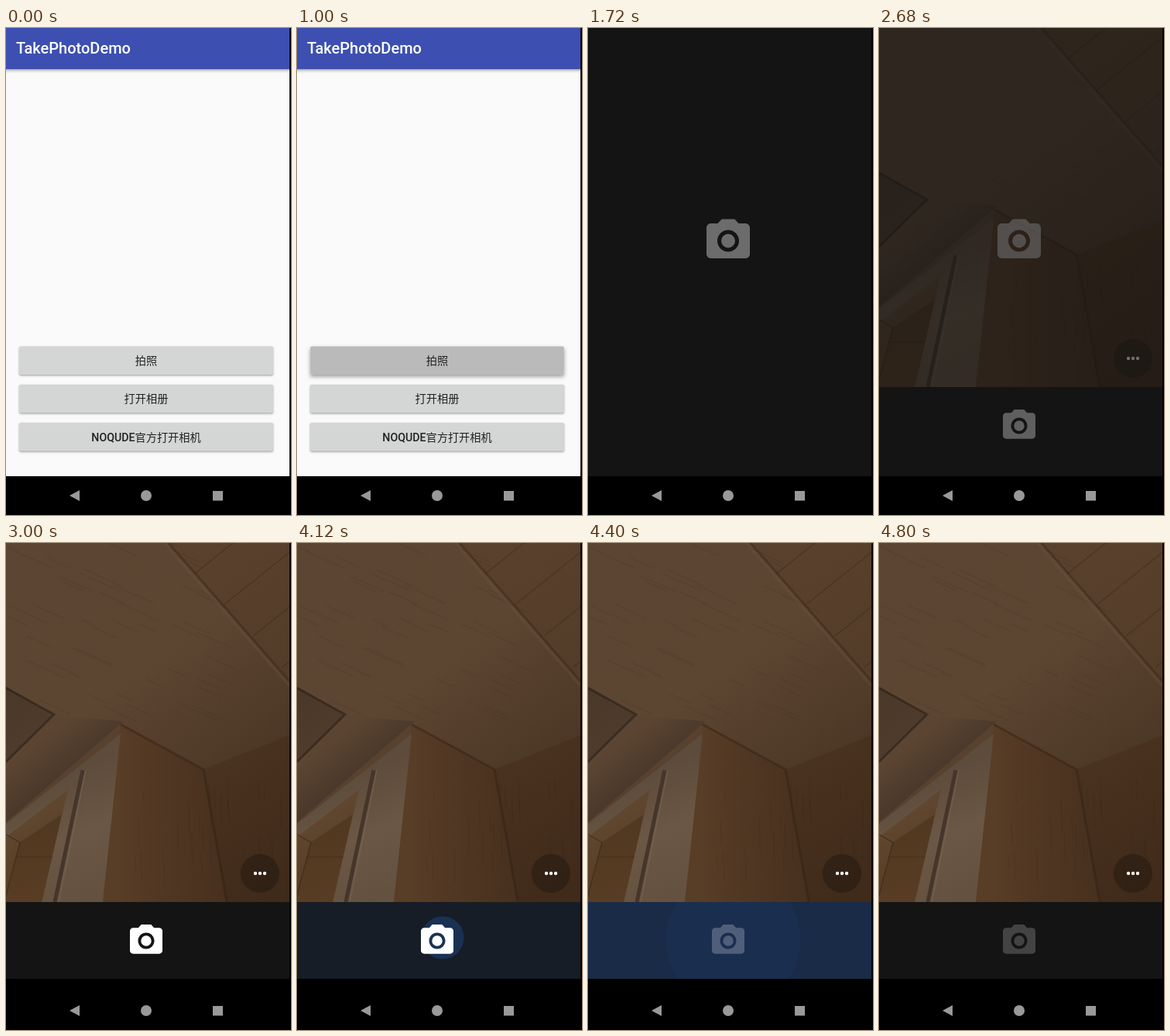
These frames come from a looping animation (368x628 px, 5.08 s). An HTML page with a canvas:

```html
<!DOCTYPE html>
<html lang="zh">
<head>
<meta charset="utf-8">
<title>TakePhotoDemo</title>
<style>
html, body { margin: 0; width: 100%; height: 100%; overflow: hidden; background: #000; }
canvas { display: block; }
</style>
</head>
<body>
<canvas id="stage" width="368" height="628"></canvas>
<script>
const LOOP = 5080;
const W = 366, NAV_Y = 578, BAR_Y = 463, BAR_END = 562;
const DARK = '#141414';
const ctx = document.getElementById('stage').getContext('2d');
const CAMERA = new Path2D('M9 2L7.17 4H4c-1.1 0-2 .9-2 2v12c0 1.1.9 2 2 2h16c1.1 0 2-.9 2-2V6c0-1.1-.9-2-2-2h-3.17L15 2H9zm3 15c-2.76 0-5-2.24-5-5s2.24-5 5-5 5 2.24 5 5-2.24 5-5 5zM15.2 12a3.2 3.2 0 1 1-6.4 0a3.2 3.2 0 1 1 6.4 0z');

const clamp = v => Math.max(0, Math.min(1, v));
const ramp = (t, from, to) => clamp((t - from) / (to - from));
const mix = (a, b, k) => a + (b - a) * k;

function rect(x, y, w, h, fill) {
  ctx.fillStyle = fill;
  ctx.fillRect(x, y, w, h);
}

function disc(c, x, y, r, fill) {
  c.fillStyle = fill;
  c.beginPath();
  c.arc(x, y, r, 0, Math.PI * 2);
  c.fill();
}

function trace(c, pts) {
  c.beginPath();
  for (let i = 0; i < pts.length; i += 2) c.lineTo(pts[i], pts[i + 1]);
}

function poly(c, fill, ...pts) {
  trace(c, pts);
  c.closePath();
  c.fillStyle = fill;
  c.fill();
}

function line(c, color, width, ...pts) {
  trace(c, pts);
  c.strokeStyle = color;
  c.lineWidth = width;
  c.stroke();
}

function shade(c, x0, y0, x1, y1, ...colors) {
  const g = c.createLinearGradient(x0, y0, x1, y1);
  colors.forEach((col, i) => g.addColorStop(i / (colors.length - 1), col));
  return g;
}

// Wooden room seen by the camera
function makeRoom() {
  const room = document.createElement('canvas');
  room.width = W;
  room.height = BAR_Y;
  const c = room.getContext('2d');
  c.fillStyle = shade(c, 60, 0, 300, 330, '#5c4532', '#5c4531', '#4a3524');
  c.fillRect(0, 0, W, BAR_Y);

  // planked ceiling on the right
  poly(c, shade(c, 240, 0, 366, 170, '#5a412d', '#533c28'), 208, 0, W, 0, W, 180);
  for (let i = 0; i < 4; i++) {
    const x = 243 + i * 38, y = 40 + i * 40;
    line(c, 'rgba(50,34,22,.4)', 1.2, x, y, x + 90, y - 72);
  }
  line(c, 'rgba(48,34,23,.35)', 3, 210, 0, W, 178);
  line(c, 'rgba(112,88,66,.25)', 4, 204, 0, W, 184);

  // recess and beam on the left
  poly(c, shade(c, 0, 200, 40, 260, '#4a3829', '#503c2c'), 0, 185, 62, 221, 0, 284);
  line(c, 'rgba(46,33,24,.6)', 3, 0, 187, 62, 221, 0, 282);
  poly(c, shade(c, 40, 260, 75, 305, '#5b4431', '#49372a'), 0, 290, 64, 222, 152, 230, 0, 360);

  // right walls
  poly(c, shade(c, 145, 0, 285, 0, '#583d27', '#4f3622', '#47301e'), 148, 232, 255, 292, 285, BAR_Y, 125, BAR_Y);
  poly(c, shade(c, 255, 280, 366, 440, '#4a331f', '#452e1c', '#402a1a'), 255, 292, W, 248, W, BAR_Y, 285, BAR_Y);
  line(c, 'rgba(45,30,19,.4)', 3, 148, 234, 255, 292, 285, BAR_Y);

  // pale door frame
  poly(c, shade(c, 60, 300, 120, 450, '#5d4b3b', '#6a5745', '#65513f'), 0, 362, 148, 246, 125, BAR_Y, 0, BAR_Y);
  poly(c, shade(c, 0, 360, 60, 450, '#614832', '#54391f'), 0, 379, 80, 318, 46, BAR_Y, 0, BAR_Y);
  poly(c, shade(c, 20, 370, 40, 463, '#513820', '#583d24'), 18, 386, 72, 350, 46, BAR_Y, 0, BAR_Y);
  line(c, 'rgba(48,32,20,.5)', 1.5, 0, 376, 18, 386, 0, 455);
  line(c, 'rgba(48,32,20,.4)', 1, 12, 405, 60, 405);
  line(c, '#45352a', 5, 99, 293, 63, BAR_Y);
  line(c, 'rgba(135,114,94,.35)', 1.5, 103, 293, 68, BAR_Y);

  grain(c);
  disc(c, 328, 426, 25, 'rgba(38,27,18,.55)');
  for (const x of [322, 328, 334]) disc(c, x, 426, 2.2, '#fff');
  return room;
}

function grain(c) {
  let seed = 11;
  const rnd = () => (seed = seed * 16807 % 2147483647) / 2147483647;
  for (let i = 0; i < 90; i++) {
    const x = rnd() * 260, y = rnd() * 210, len = 15 + rnd() * 40;
    line(c, i % 2 ? 'rgba(120,94,68,.06)' : 'rgba(40,26,16,.07)', 1.5, x, y, x + len, y + len * 0.45);
  }
  for (let i = 0; i < 50; i++) {
    const x = 152 + rnd() * 205, y = 300 + rnd() * 120;
    line(c, i % 2 ? 'rgba(115,82,52,.08)' : 'rgba(35,22,12,.1)', 1.2, x, y, x + 1, y + 15 + rnd() * 30);
  }
}

const room = makeRoom();

function camera(x, y, scale, color, alpha) {
  ctx.save();
  ctx.globalAlpha *= alpha;
  ctx.translate(x, y);
  ctx.scale(scale, scale);
  ctx.translate(-12, -12);
  ctx.fillStyle = color;
  ctx.fill(CAMERA, 'evenodd');
  ctx.restore();
}

function button(y, label, press) {
  ctx.save();
  ctx.shadowColor = 'rgba(0,0,0,.36)';
  ctx.shadowBlur = 2.5 + press * 3;
  ctx.shadowOffsetY = 1.2 + press * 1.5;
  ctx.fillStyle = '#d4d6d5';
  ctx.beginPath();
  ctx.roundRect(17, y, 328, 36.5, 2);
  ctx.fill();
  ctx.restore();
  if (press) {
    ctx.save();
    ctx.clip();
    rect(17, y, 328, 37, `rgba(0,0,0,${0.08 * press})`);
    disc(ctx, 181, y + 18, 40 + 130 * press, `rgba(0,0,0,${0.06 * press})`);
    ctx.restore();
  }
  ctx.font = '500 14.2px Roboto, "Noto Sans CJK SC", "Noto Sans CJK", sans-serif';
  ctx.textAlign = 'center';
  ctx.fillStyle = '#212121';
  ctx.fillText(label, 181, y + 23.5);
}

function drawMenu(t) {
  rect(0, 0, W, NAV_Y, '#fafafa');
  rect(0, 53, W, 6, shade(ctx, 0, 53, 0, 59, 'rgba(0,0,0,.32)', 'rgba(0,0,0,.08)', 'rgba(0,0,0,0)'));
  rect(0, 0, W, 53, '#3d4fb1');
  ctx.font = '500 20px Roboto, sans-serif';
  ctx.textAlign = 'left';
  ctx.fillStyle = '#fff';
  ctx.fillText('TakePhotoDemo', 13, 33);
  const press = t >= 920 && t < 1080 ? Math.sin(Math.PI * ramp(t, 880, 1080)) : 0;
  button(410.5, '拍照', press);
  button(459.7, '打开相册', 0);
  button(509, 'NOQUDE官方打开相机', 0);
}

// Opening window; y is its offset from the resting place
function drawCover(alpha, y, bottom) {
  ctx.save();
  ctx.globalAlpha = alpha;
  ctx.beginPath();
  ctx.rect(0, 0, W, bottom);
  ctx.clip();
  rect(0, Math.max(0, y - 30), W, bottom, DARK);
  camera(181, 274.5 + y, 2.8, '#6c6c6c', 1);
  ctx.restore();
}

function drawRipple(t) {
  if (t < 4120 || t >= 4800) return;
  const fade = 1 - ramp(t, 4640, 4800);
  const tint = a => `rgba(32,74,140,${a})`;
  const grow = (t - 4120) / 280;
  ctx.save();
  ctx.beginPath();
  ctx.rect(0, BAR_Y, W, BAR_END - BAR_Y);
  ctx.clip();
  rect(0, BAR_Y, W, 99, tint(mix(0.16, 0.42, clamp(grow)) * fade));
  const spot = mix(0.45, 0.13, clamp(grow)) * (1 - ramp(t, 4400, 4560));
  disc(ctx, mix(188, 187.5, grow), mix(509, 512, grow), mix(27.5, 87, grow), tint(spot));
  ctx.restore();
}

function shutterAlpha(t) {
  if (t < 2280) return 0.1;
  if (t < 4120) return mix(0.2, 1, ramp(t, 2480, 3000) ** 2);
  return mix(1, 0.2, ramp(t, 4190, 4410));
}

function drawCamera(t) {
  const open = ramp(t, 2480, 3000);
  ctx.drawImage(room, 0, 0);
  rect(0, BAR_Y, W, (t < 2760 ? NAV_Y : BAR_END) - BAR_Y, DARK);
  drawRipple(t);
  if (open < 1) drawCover(1 - open, 0, BAR_Y);
  if (t >= 2240) camera(181, 513, 2.1, '#fff', shutterAlpha(t));
}

function drawNav() {
  const gray = '#999';
  poly(ctx, gray, 82, 603, 95, 596, 95, 610);
  disc(ctx, 181, 603, 7, gray);
  rect(267, 597, 13, 12.5, gray);
}

function frame(now) {
  const t = Math.floor((now % LOOP) / 40) * 40;
  rect(0, 0, 368, 628, '#000');
  if (t < 1560) {
    drawMenu(t);
    if (t >= 1480) drawCover(0.265, 43, NAV_Y);
  } else {
    drawCamera(t);
  }
  drawNav();
}

let start;
function tick(now) {
  start ??= now;
  frame(now - start);
  requestAnimationFrame(tick);
}
frame(0);
requestAnimationFrame(tick);
</script>
</body>
</html>
```
